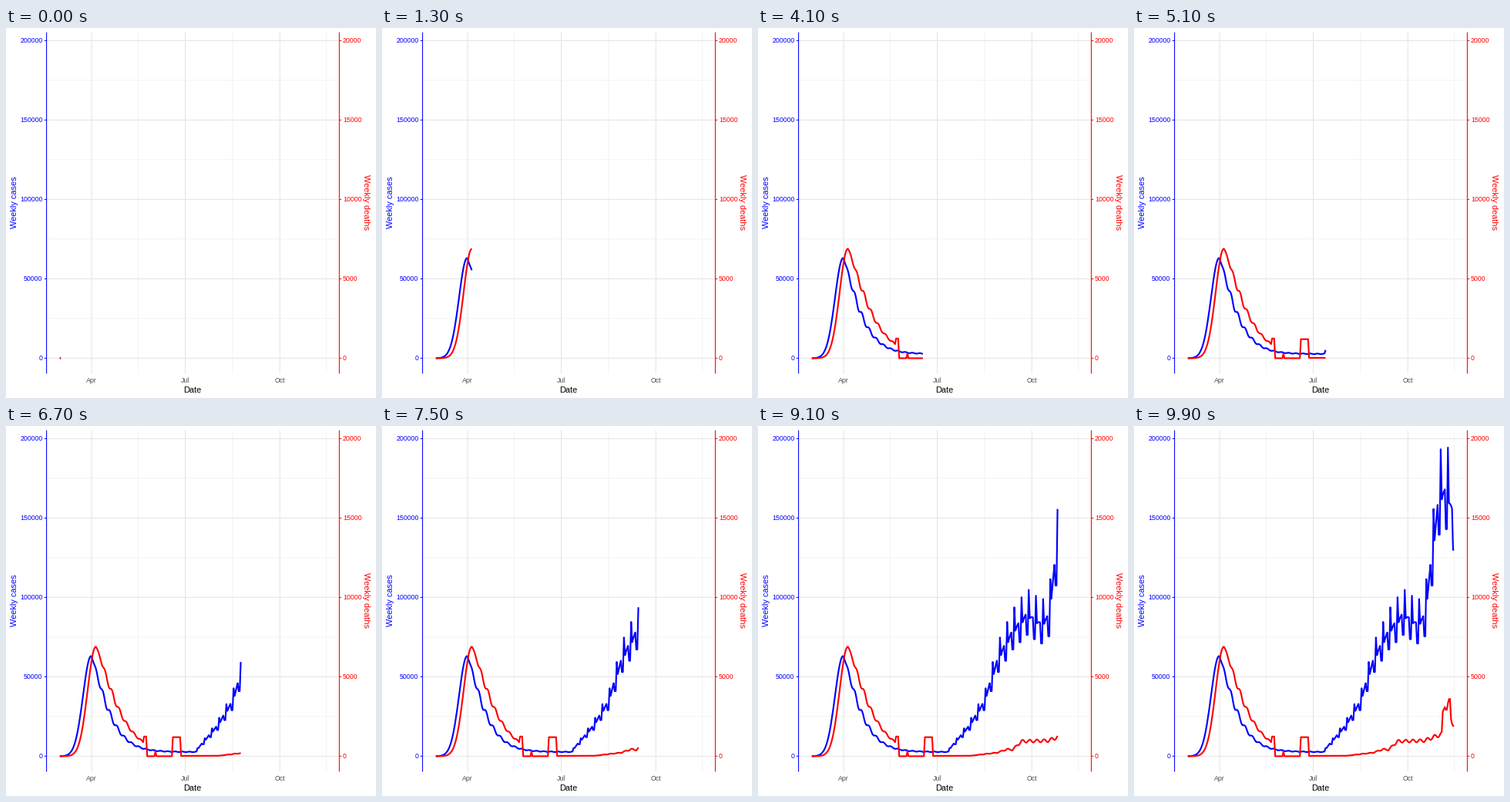
These frames come from a looping animation (480x480 px, 10 s). A matplotlib script:

```python
import numpy as np
import matplotlib.pyplot as plt
from matplotlib.animation import FuncAnimation

SIZE, DPI = 480, 100
FRAMES, LAST_DAY = 100, 259
LEFT, RIGHT, TOP, BOTTOM = 52.6, 432.4, 5.5, 448.4
BLUE, RED = "#0000FF", "#FF0000"

plt.rcParams["font.family"] = "Liberation Sans"
PT = 72 / DPI


def x_px(day):
    return 69.8 + 1.3338 * np.asarray(day, float)


def y_px(thousands):
    return 428.4 - 2.06 * np.asarray(thousands, float)


days = np.arange(LAST_DAY + 1)


def ripple(peak_day, size):
    """Weekly swing around 1, highest on peak_day (0 = Sunday)."""
    return 1 + size * np.cos(2 * np.pi * (days - peak_day) / 7)


def wave(peak, height, base, decay, swing):
    """Gaussian rise, then a slower fall to base with a weekly ripple."""
    t = days - peak
    rise = height * np.exp(-t ** 2 / 124)
    fall = base + (height - base) * np.exp(-(t.clip(0) / decay) ** 1.25)
    fall *= 1 + (swing - 1) * (t / 15).clip(0, 1)
    return np.where(t < 0, rise, fall)


def follow(x, points):
    return np.interp(x, *zip(*points))


# Weekly cases, in thousands: the autumn level climbs on working days only
weekday = np.array([1, 1.38, 1.15, 1.165, 1.175, 1.18, 1])
level = follow(days // 7 + days % 7 / 6, [
    (19, 3), (22, 16.5), (24, 29), (26, 53), (28, 67.2), (30, 76.4),
    (32, 71), (33, 75.5), (35, 139.5), (36, 143), (37, 130)])
spring = wave(30.5, 63.2, 2.7, 19.5, ripple(0, .07))
cases = np.where(days < 133, spring, level * weekday[days % 7])

# Weekly deaths, drawn on the cases scale
autumn = follow(days, [
    (118, .2), (155, .3), (170, 1.5), (180, 2.2), (190, 4.4), (195, 4),
    (204, 9.4), (230, 9.8), (247, 14), (248, 26.5), (250, 34), (252, 30),
    (255, 34), (256, 24), (258, 21), (259, 19.6)])
spring = wave(35, 69, 1, 25, ripple(2, .05))
deaths = np.where(days < 85, spring, autumn * ripple(2, .1))

# Reporting corrections: bumps and a gap in the weekly sum
deaths[82:85] = 12.4
deaths[85:110] = 0
deaths[93] = 3
deaths[110:118] = 12

fig = plt.figure(figsize=(SIZE / DPI, SIZE / DPI), dpi=DPI, facecolor="white")
ax = fig.add_axes([0, 0, 1, 1])
ax.set(xlim=(0, SIZE), ylim=(SIZE, 0))
ax.axis("off")


def rule(x0, y0, x1, y1, color, width=1.07):
    ax.plot([x0, x1], [y0, y1], color=color, lw=width * PT,
            solid_capstyle="butt", snap=False, zorder=1)


def label(x, y, text, color, px=8.8, **kw):
    ax.text(x, y, text, color=color, fontsize=px * PT, zorder=4, **kw)


# Grid
months = {"Apr": 31, "Jul": 122, "Oct": 214}
for day in (76.5, 168, 259.2):
    rule(x_px(day), TOP, x_px(day), BOTTOM, "#EBEBEB", .6)
for value in range(25, 200, 50):
    rule(LEFT, y_px(value), RIGHT, y_px(value), "#EBEBEB", .6)
for name, day in months.items():
    rule(x_px(day), TOP, x_px(day), BOTTOM, "#E6E6E6")
    label(x_px(day), 460.2, name, "#4D4D4D", ha="center", va="baseline")
for value in range(0, 201, 50):
    y = y_px(value)
    rule(LEFT, y, RIGHT, y, "#E6E6E6")
    rule(LEFT - 2.7, y, LEFT, y, BLUE)
    rule(RIGHT, y, RIGHT + 2.7, y, RED)
    label(47.4, y + 2.9, str(value * 1000), BLUE, ha="right", va="baseline")
    label(437, y + 2.9, str(value * 100), RED, ha="left", va="baseline")

# Axes and titles
rule(LEFT, TOP, LEFT, BOTTOM, BLUE)
rule(RIGHT, TOP, RIGHT, BOTTOM, RED)
title = dict(px=11, ha="center", va="center")
label(11, 225.8, "Weekly cases", BLUE, rotation=90, **title)
label(467, 226.2, "Weekly deaths", RED, rotation=270, **title)
label(241.8, 473, "Date", "black", px=11, ha="center", va="baseline")


def curve(color, z):
    return ax.plot([], [], color=color, lw=2.13 * PT, zorder=z, snap=False,
                   solid_capstyle="butt", solid_joinstyle="round")[0]


curves = [(curve(BLUE, 2), cases), (curve(RED, 3), deaths)]


def draw(i):
    end = min(LAST_DAY, int(1.4 + LAST_DAY * i / (FRAMES - 1))) + 1
    for line, values in curves:
        line.set_data(x_px(days[:end]), y_px(values[:end]))
    return [line for line, _ in curves]


anim = FuncAnimation(fig, draw, frames=FRAMES, interval=100,
                     repeat=True, repeat_delay=0)
plt.show()
```
